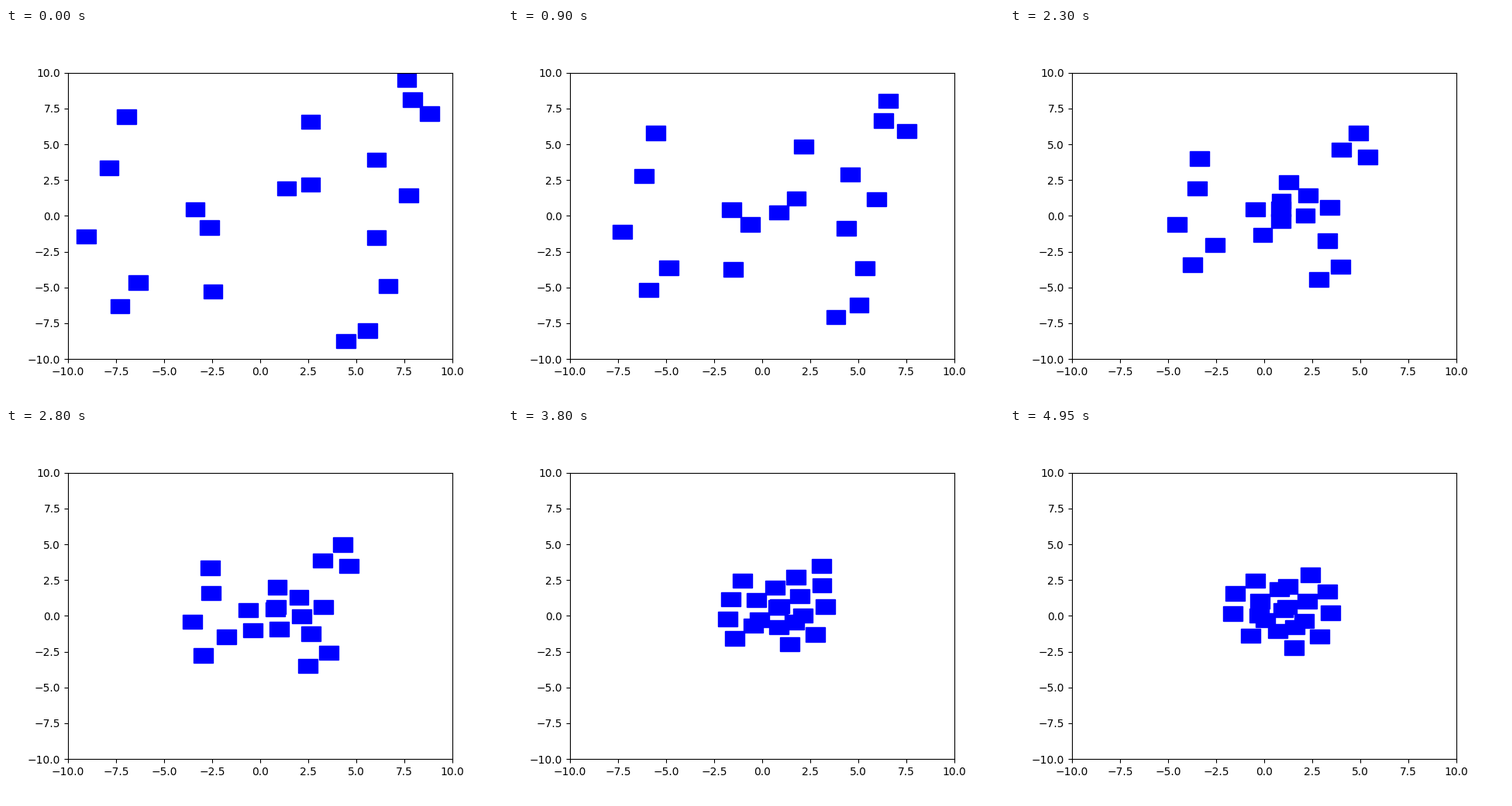
A matplotlib script that plays this animation: 640 by 480 pixels, repeating every 5000 ms.

```python
import numpy as np
import matplotlib.pyplot as plt
from matplotlib.animation import FuncAnimation

FRAMES, INTERVAL = 100, 50
STEP = 0.1             # length of one pull or push, in axis units
REACH = np.sqrt(2)     # boxes closer than their diagonal push apart

# centres of the scattered boxes, those nearest the middle first
START = [(1.37, 1.92), (2.62, 2.19), (-2.64, -0.82), (-3.39, 0.45),
         (6.05, -1.52), (6.05, 3.92), (2.62, 6.57), (7.72, 1.43),
         (-2.46, -5.28), (6.65, -4.90), (-7.86, 3.35), (-6.35, -4.66),
         (5.60, -8.01), (4.46, -8.74), (7.92, 8.11), (8.82, 7.14),
         (7.62, 9.49), (-6.94, 6.92), (-9.05, -1.43), (-7.30, -6.31)]


def unit(v):
    """Scale vectors to length one; zero vectors stay zero."""
    return v / np.maximum(np.linalg.norm(v, axis=-1, keepdims=True), 1e-9)


def advance(pos):
    """Move the boxes in turn: pulled to the middle, pushed by neighbours."""
    pos = pos.copy()
    for i, p in enumerate(pos):
        away = p - pos
        near = np.linalg.norm(away, axis=1) < REACH
        pull = unit(pos.mean(axis=0) - p)
        push = unit(away[near]).sum(axis=0)
        pos[i] = p + STEP * (pull + push)
    return pos


track = [np.array(START)]
while len(track) < FRAMES:
    track.append(advance(track[-1]))

fig, ax = plt.subplots(figsize=(6.4, 4.8), dpi=100)
ax.set_xlim(-10, 10)
ax.set_ylim(-10, 10)
boxes = [ax.add_patch(plt.Rectangle(c - 0.5, 1, 1, color="blue"))
         for c in track[0]]


def update(frame):
    for box, c in zip(boxes, track[frame]):
        box.set_xy(c - 0.5)
    return boxes


anim = FuncAnimation(fig, update, frames=FRAMES, interval=INTERVAL,
                     init_func=lambda: update(0), repeat=True, repeat_delay=0)
plt.show()
```
